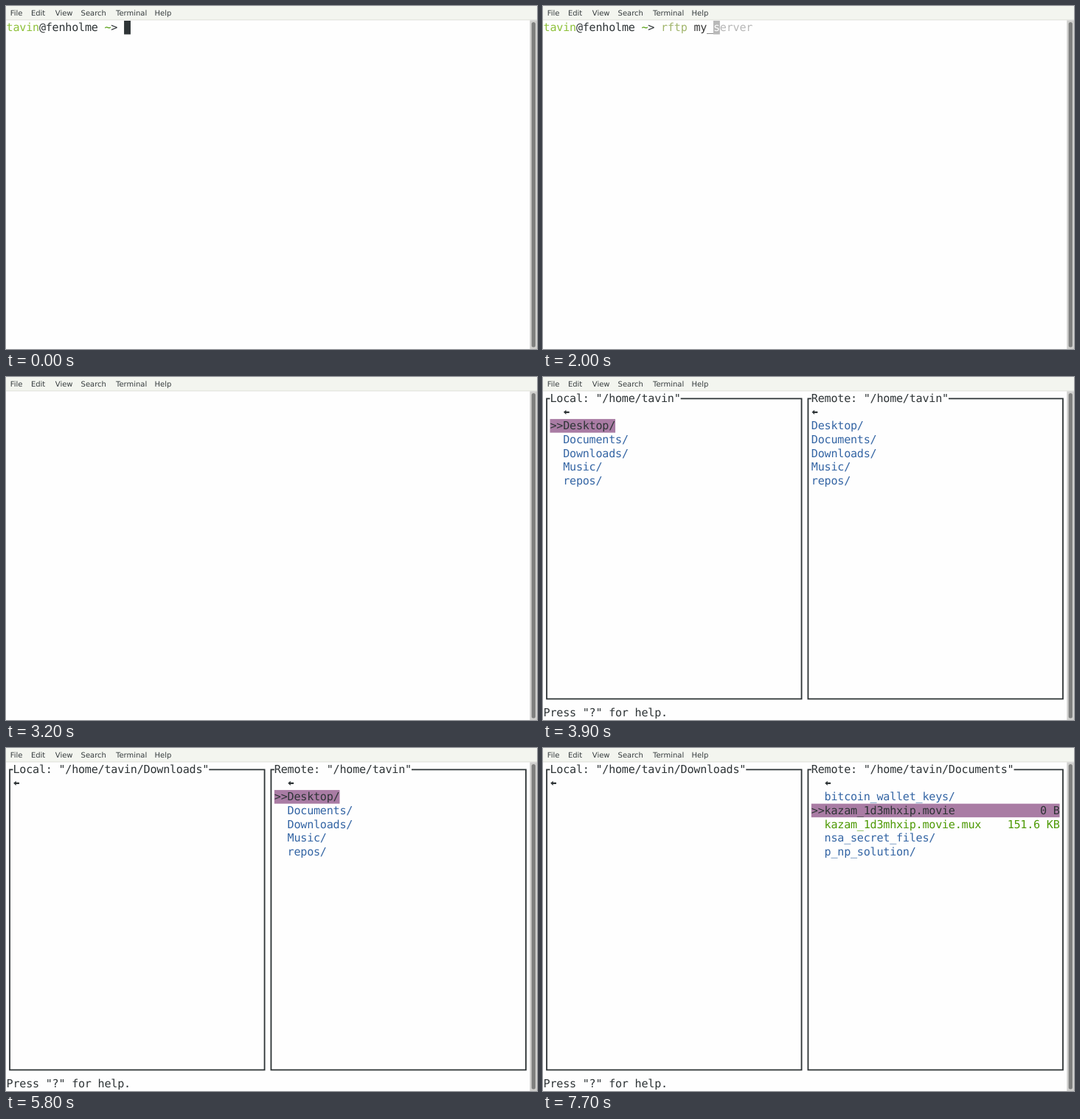
Write an HTML page that moves like this. It is 720x466 px and loops after 8000 ms.

```html
<!DOCTYPE html>
<html lang="en">
<head>
<meta charset="utf-8">
<title>Terminal file transfer</title>
<style>
  html, body { margin: 0; width: 100%; height: 100%; overflow: hidden; background: #fefefe; }
  svg { display: block; width: 720px; height: 466px; }
  text { white-space: pre; text-rendering: geometricPrecision; }
  .menu text { font: 10px "DejaVu Sans", sans-serif; fill: #363c3e; }
  #screen text { font: 15.1px "DejaVu Sans Mono", monospace; letter-spacing: -0.231px; }
</style>
</head>
<body>
<svg viewBox="0 0 720 466">
  <rect width="720" height="466" fill="#fefefe"/>
  <g class="menu">
    <rect width="720" height="19" fill="#f3f5ef"/>
    <rect y="18.4" width="720" height="1" fill="#dedfda"/>
    <text x="5.7" y="13">File</text>
    <text x="33.9" y="13">Edit</text>
    <text x="66.8" y="13">View</text>
    <text x="101.6" y="13">Search</text>
    <text x="149" y="13">Terminal</text>
    <text x="201.6" y="13">Help</text>
  </g>
  <rect x="710.3" y="19.4" width="9.7" height="446.6" fill="#cfcfcd"/>
  <rect x="712.7" y="22" width="5.2" height="441.5" rx="2.6" fill="#7e7f7e"/>
  <g id="screen"></g>
</svg>
<script>
const LOOP = 8000;
const CELL = 8.86, ROW = 18.55, LEFT = 0.6, TOP = 20;
const INK = '#2e3436', DIR = '#3465a4', FILE = '#4e9a06', MARK = '#a97ca4';
const GHOST = '#b8b8b8', PAPER = '#fefefe';

const USER = 'tavin', HOST = 'fenholme', COMMAND = 'rftp my_server';
const HOME = '/home/' + USER;
const HOME_LIST = ['Desktop/', 'Documents/', 'Downloads/', 'Music/', 'repos/'];
const DOCS_LIST = ['bitcoin_wallet_keys/', ['kazam_1d3mhxip.movie', '0 B'],
  ['kazam_1d3mhxip.movie.mux', '151.6 KB'], 'nsa_secret_files/', 'p_np_solution/'];

// [time, characters typed]
const TYPING = [[0, 0], [400, 1], [600, 2], [800, 3], [1000, 4], [1600, 5], [1700, 6],
  [1800, 7], [2000, 8], [2100, 9], [2200, 11], [2400, 12], [2600, 13], [2700, 14]];
const ENTER = 3100, CLEAR = 3200, BROWSE = 3300;

// [time, active pane, selected line, local folder, remote folder]
const BROWSING = [
  [BROWSE, 0, 0, '', ''],
  [3900, 0, 1, '', ''],
  [4200, 0, 2, '', ''],
  [4800, 0, 3, '', ''],
  [5200, 0, 0, '/Downloads', ''],
  [5500, 1, 0, '/Downloads', ''],
  [5800, 1, 1, '/Downloads', ''],
  [6300, 1, 2, '/Downloads', ''],
  [6700, 1, 3, '/Downloads', ''],
  [7200, 1, 2, '/Downloads', ''],
  [7600, 1, 2, '/Downloads', '/Documents']
];
const LISTS = { '': HOME_LIST, '/Downloads': [], '/Documents': DOCS_LIST };

const screen = document.getElementById('screen');
const colX = c => LEFT + c * CELL;
const rowY = r => TOP + r * ROW;

function add(tag, attrs, content) {
  const el = document.createElementNS('http://www.w3.org/2000/svg', tag);
  for (const key in attrs) el.setAttribute(key, attrs[key]);
  if (content) el.textContent = content;
  screen.appendChild(el);
}

function print(col, row, str, fill = INK) {
  if (str) add('text', { x: colX(col), y: rowY(row) + 14.3, fill }, str);
}

function block(col, row, cells, fill) {
  add('rect', { x: colX(col), y: rowY(row), width: cells * CELL, height: ROW, fill });
}

function arrow(col, row) {
  add('path', {
    transform: `translate(${colX(col)} ${rowY(row) + 9.3})`,
    d: 'M.7 0L4.2-3.2V-1.2H8.5V1.2H4.2V3.2Z',
    fill: INK
  });
}

function drawShell(typed, entered) {
  const start = 18, at = start + typed;
  const name = COMMAND.slice(0, Math.min(typed, 4));
  print(0, 0, USER, '#8ec13a');
  print(5, 0, '@' + HOST);
  print(15, 0, '~', FILE);
  print(16, 0, '>');
  print(start, 0, name, typed < 4 ? '#ab4642' : '#a1b56c');
  if (typed > 5) print(start + 5, 0, COMMAND.slice(5, typed), '#383838');
  if (entered) return block(0, 1, 1, INK);
  const hint = typed > 0 && typed < COMMAND.length;
  block(at, 0, 1, hint ? GHOST : INK);
  if (hint) {
    print(at, 0, COMMAND[typed], PAPER);
    print(at + 1, 0, COMMAND.slice(typed + 1), GHOST);
  }
}

function drawPane(first, label, folder, selected) {
  const title = `${label}: "${HOME}${folder}"`;
  const col = first + 1, active = selected >= 0;
  const mid = c => colX(c) + CELL / 2;
  const top = rowY(0) + ROW / 2, bottom = rowY(22) + ROW / 2;
  add('path', {
    d: `M${colX(col)} ${top}H${mid(first)}V${bottom}H${mid(first + 39)}V${top}H${colX(col + title.length)}`,
    fill: 'none', stroke: INK, 'stroke-width': 1.8
  });
  print(col, 0, title);

  const textCol = active ? col + 2 : col;
  ['', ...LISTS[folder]].forEach((entry, i) => {
    const row = i + 1, isFile = Array.isArray(entry);
    const [name, size] = isFile ? entry : [entry, ''];
    const on = i === selected;
    const color = on ? INK : isFile ? FILE : DIR;
    if (on) {
      block(col, row, isFile ? 38 : 2 + (name.length || 1), MARK);
      print(col, row, '>>');
    }
    if (i === 0) arrow(textCol, row);
    print(textCol, row, name, color);
    print(first + 39 - size.length, row, size, color);
  });
}

function drawBrowser([, pane, line, local, remote]) {
  drawPane(0, 'Local', local, pane === 0 ? line : -1);
  drawPane(40, 'Remote', remote, pane === 1 ? line : -1);
  print(0, 23, 'Press "?" for help.');
}

const scenes = [
  ...TYPING.map(([at, n]) => ({ at, draw: () => drawShell(n, false) })),
  { at: ENTER, draw: () => drawShell(COMMAND.length, true) },
  { at: CLEAR, draw: () => {} },
  ...BROWSING.map(step => ({ at: step[0], draw: () => drawBrowser(step) }))
];

let shown = null;
const began = performance.now();

function tick() {
  const time = (performance.now() - began) % LOOP;
  const scene = scenes.filter(s => s.at <= time).pop() || scenes[0];
  if (scene !== shown) {
    screen.replaceChildren();
    scene.draw();
    shown = scene;
  }
  requestAnimationFrame(tick);
}
tick();
</script>
</body>
</html>
```
